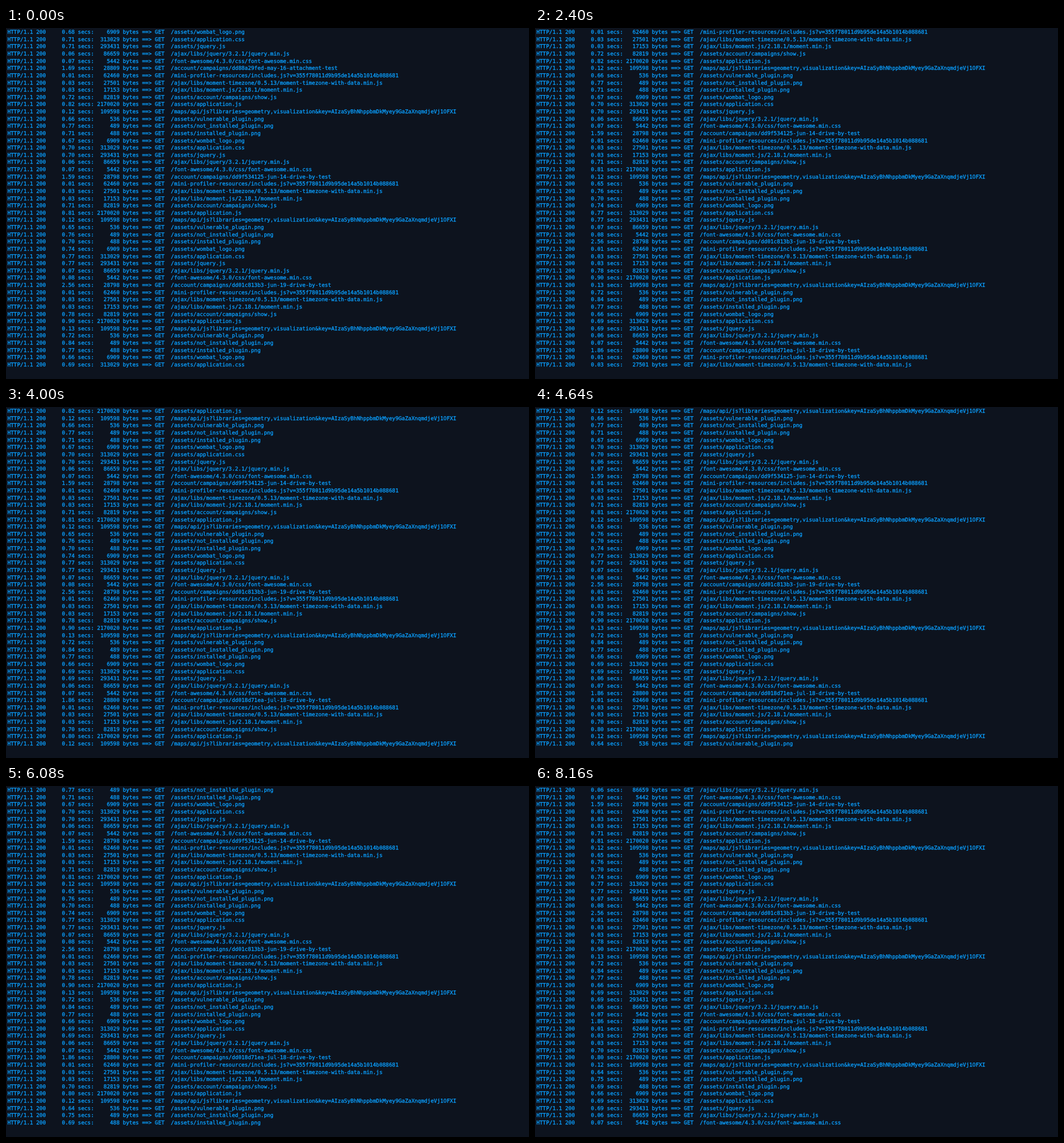
Write an HTML page that moves like this. It is 913x613 px and loops after 8960 ms.

```html
<!DOCTYPE html>
<html lang="en">
<head>
<meta charset="utf-8">
<title>Request log</title>
<style>
  html, body { margin: 0; width: 100%; height: 100%; overflow: hidden; background: #0d131e; }
  pre {
    position: absolute; left: 2.4px; top: 2.2px; margin: 0;
    font: 9.313px/12.63px "DejaVu Sans Mono", monospace;
    text-rendering: geometricPrecision;
    font-variant-ligatures: none;
    color: #0a9fff;
    -webkit-text-stroke: .32px #0a9fff;
  }
</style>
</head>
<body>
<pre id="log"></pre>
<script>
const LOOP = 8960, ROWS = 47, LINES = 65;
const TICK = 160;    // the screen refreshes on this grid
const PACE = 970;    // playback ms per logged second
const START = -244;  // when the first new request is sent

// One page load: typical seconds, bytes, path
const requests = `
0.66 6909 /assets/wombat_logo.png
0.69 313029 /assets/application.css
0.69 293431 /assets/jquery.js
0.06 86659 /ajax/libs/jquery/3.2.1/jquery.min.js
0.07 5442 /font-awesome/4.3.0/css/font-awesome.min.css
campaign
0.01 62460 /mini-profiler-resources/includes.js?v=355f78011d9b95de14a5b1014b088681
0.03 27501 /ajax/libs/moment-timezone/0.5.13/moment-timezone-with-data.min.js
0.03 17153 /ajax/libs/moment.js/2.18.1/moment.min.js
0.70 82819 /assets/account/campaigns/show.js
0.80 2170020 /assets/application.js
0.12 109598 /maps/api/js?libraries=geometry,visualization&key=AIzaSyBhNhppbmDkMyey9GaZaXnqmdjeVj1OFXI
0.64 536 /assets/vulnerable_plugin.png
0.75 489 /assets/not_installed_plugin.png
0.69 488 /assets/installed_plugin.png`.trim().split('\n');

// The page that differs per load, and how slow that load is overall
const loads = [
  { slow: 1.03, page: '1.69 28809 /account/campaigns/dd88a29fed-may-16-attachment-test' },
  { slow: 1.01, page: '1.59 28798 /account/campaigns/dd9f534125-jun-14-drive-by-test' },
  { slow: 1.12, page: '2.56 28798 /account/campaigns/dd01c813b3-jun-19-drive-by-test' },
  { slow: 1, page: '1.86 28800 /account/campaigns/dd018d71ea-jul-18-drive-by-test' },
  { slow: 1 },
];

function request(i) {
  const load = loads[Math.floor(i / requests.length)];
  const entry = requests[i % requests.length];
  const isPage = entry === 'campaign';
  const [secs, bytes, path] = (isPage ? load.page : entry).split(' ');
  return { secs: secs * (isPage ? 1 : load.slow), bytes, path };
}

// Each request is sent when the one before it has finished
let clock = START;
const lines = Array.from({ length: LINES }, (_, i) => {
  const { secs, bytes, path } = request(i);
  if (i >= ROWS) clock += secs * PACE;
  return {
    time: i < ROWS ? 0 : Math.ceil(clock / TICK) * TICK,
    text: `HTTP/1.1 200     ${secs.toFixed(2)} secs: ${bytes.padStart(7)} bytes ==> GET  ${path}`,
  };
});

const log = document.getElementById('log');
let shown = 0;

function draw() {
  const t = performance.now() % LOOP;
  const logged = lines.filter(line => line.time <= t);
  if (logged.length !== shown) {
    log.textContent = logged.slice(-ROWS).map(line => line.text).join('\n');
    shown = logged.length;
  }
  requestAnimationFrame(draw);
}
draw();
</script>
</body>
</html>
```
